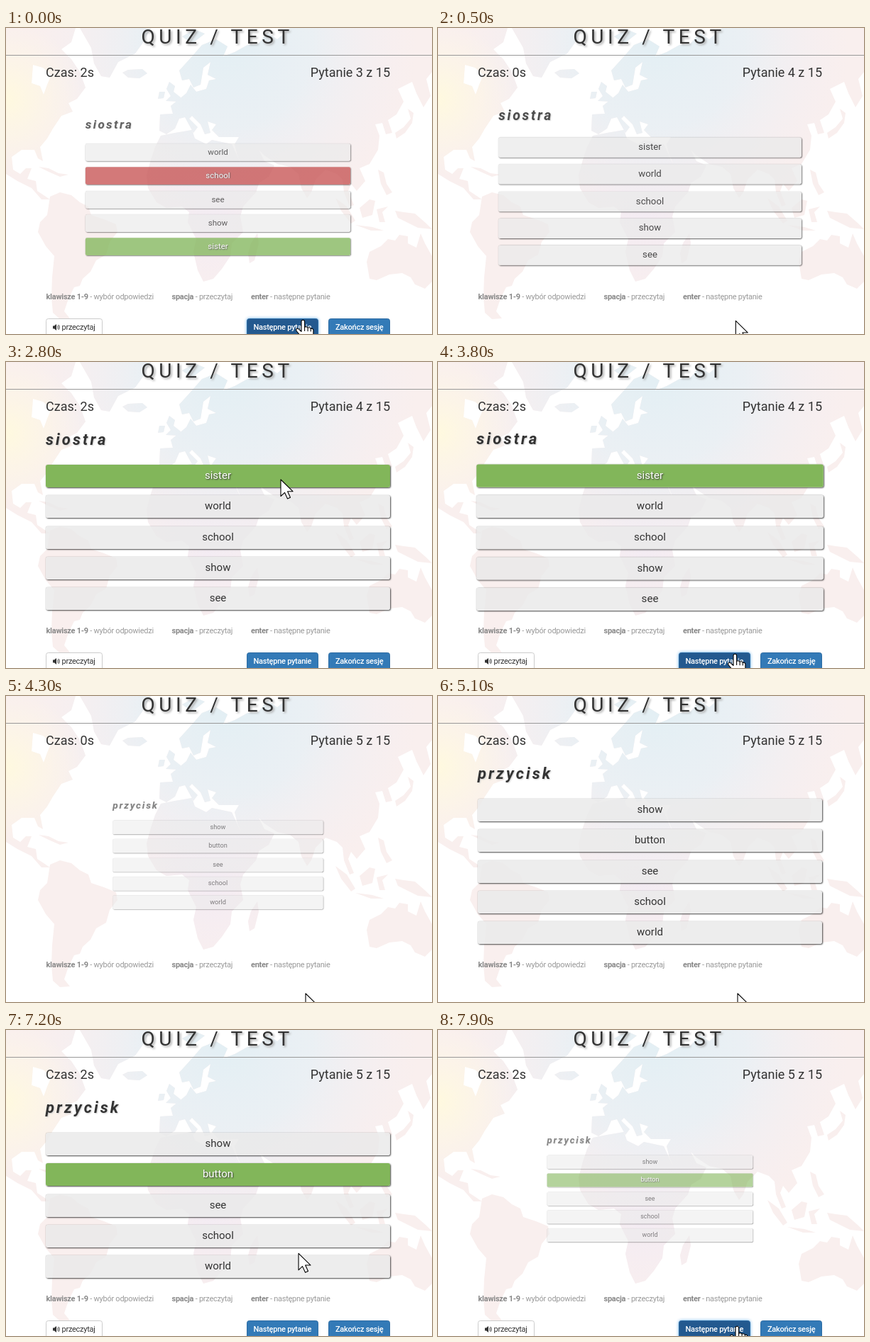
An HTML page for the animation above (8 s loop, 600 by 432 pixels).

```html
<!DOCTYPE html>
<html lang="pl">
<meta charset="utf-8">
<title>Quiz / Test</title>
<style>
html, body { margin: 0; width: 100%; height: 100%; overflow: hidden; background: #fff; font-family: Roboto, sans-serif; color: #333 }
svg, #panel { position: absolute; left: 0; top: 0; width: 600px; height: 432px }
#panel { transform-origin: 298.5px 224px }
#word { position: absolute; left: 56px; top: 98.5px; font: italic bold 22px/22px Roboto, sans-serif; letter-spacing: 3.1px; text-shadow: 1px 1px 2px #ccc }
.row { position: absolute; left: 56px; width: 485px; height: 32px; font-size: 15px; line-height: 31px; text-align: center;
  border-radius: 3px; background: rgba(234,234,234,.85); box-shadow: 1px 1px 2px rgba(0,0,0,.7), 0 0 1px rgba(0,0,0,.4) }
.mark { position: absolute; inset: 0; border-radius: 3px; color: #fff; text-shadow: 1px 1px 2px #333 }
.small { font-size: 11px; letter-spacing: -.26px }
.hint { fill: #999 }
.hint tspan { font-weight: bold; fill: #888 }
.blue { fill: #337ab7; stroke: #2e6da4 }
.white { fill: #fff; font-weight: 500 }
</style>
<svg viewBox="0 0 600 432">
  <defs>
    <radialGradient id="sky" gradientUnits="userSpaceOnUse" cx="310" cy="20" r="270">
      <stop stop-color="#e3eff4"/><stop offset=".45" stop-color="#e8f0f5" stop-opacity=".85"/><stop offset="1" stop-color="#f2eef4" stop-opacity="0"/>
    </radialGradient>
    <radialGradient id="sun" gradientUnits="userSpaceOnUse" cx="0" cy="100" r="110">
      <stop stop-color="#fff9df"/><stop offset="1" stop-color="#fff9e6" stop-opacity="0"/>
    </radialGradient>
    <radialGradient id="lilac" gradientUnits="userSpaceOnUse" cx="290" cy="270" r="130">
      <stop stop-color="#f4ecf3"/><stop offset="1" stop-color="#f4ecf3" stop-opacity="0"/>
    </radialGradient>
    <clipPath id="land">
      <!-- Americas -->
      <path d="M0 0H98L92 20 78 30 92 44 104 62 112 84 100 100 88 106 94 118 78 124 66 142 58 156 48 168 52 188 45 184 40 172 22 172 8 182 10 200 20 206 28 198 36 198 30 213 42 216 44 230 56 238 62 242 50 242 36 226 16 216 0 206ZM38 52L36 78 48 82 53 94 58 80 64 66 52 56Z" clip-rule="evenodd"/>
      <path d="M62 238L76 232 92 236 104 246 116 252 120 264 138 270 155 277 157 288 146 302 141 320 127 328 119 344 108 354 104 364 96 366 90 378 86 388 82 400 90 410 76 411 66 402 64 380 65 352 68 322 56 308 45 288 48 274 58 264Z"/>
      <path d="M104 0H204L192 22 182 36 158 48 146 70 134 68 124 50 120 28Z"/>
      <path d="M164 63L172 59 192 58 199 64 188 71 172 70ZM46 196L60 198 74 205 88 207 76 210 60 203Z"/>
      <!-- Europe and Asia -->
      <path d="M216 145L217 122 235 121 232 110 242 102 254 92 260 80 268 90 282 86 286 74 296 72 284 66 288 48 278 56 274 80 264 84 258 72 248 74 244 60 262 40 276 24 296 16 312 26 306 40 322 34 340 24 356 22 368 6 382 16 400 0H600V62L592 72 598 96 588 112 578 92 572 76 552 86 560 104 550 122 538 130 544 148 535 150 530 134 520 136 526 152 524 172 512 192 498 198 506 216 494 230 486 220 482 230 490 250 484 252 476 232 474 214 466 206 450 200 436 214 430 232 424 240 416 226 412 206 400 196 382 192 364 180 356 172 364 188 378 194 370 210 348 224 340 212 326 180 322 164 328 154 300 154 290 144 296 136 284 132 288 148 280 150 274 136 262 124 258 128 270 140 264 148 252 126 244 128 238 142 226 150Z"/>
      <path d="M225 103L232 96 226 86 230 76 238 82 236 90 246 98 242 104ZM216 90L224 90 222 99 214 100ZM548 148L560 140 570 128 566 114 574 120 572 134 562 148 550 156ZM248 12L266 2 280 8 262 22Z"/>
      <!-- Africa -->
      <path d="M218 152L238 148 262 144 266 156 282 164 290 158 318 164 328 186 340 208 346 216 358 214 352 232 334 252 330 266 334 288 318 304 316 322 304 340 292 354 278 358 270 342 264 316 268 298 256 274 258 260 248 252 226 254 212 246 200 226 198 208 204 186 210 168Z"/>
      <path d="M354 290L356 304 350 328 343 332 341 318 345 304Z"/>
      <!-- Islands and Australia -->
      <path d="M464 240L480 252 492 272 486 276 472 258ZM498 254L512 242 520 244 516 264 502 268ZM492 278L516 281 532 286 514 286ZM522 256L538 252 530 260 534 274 526 274ZM548 258L560 260 576 262 592 276 600 284 580 282 568 276 552 268ZM524 200L532 204 536 220 544 232 536 236 528 220Z"/>
      <path d="M508 330L512 316 528 308 538 298 548 300 554 292 566 294 566 304 578 310 584 290 590 304 600 322V358L590 368 576 362 570 352 558 346 540 348 522 356 512 354Z"/>
    </clipPath>
  </defs>
  <g clip-path="url(#land)">
    <path fill="#f9efee" d="M0 0H600V432H0Z"/>
    <path fill="url(#lilac)" d="M0 0H600V432H0Z"/>
    <path fill="url(#sky)" d="M0 0H600V432H0Z"/>
    <path fill="url(#sun)" d="M0 0H600V432H0Z"/>
  </g>
</svg>
<div id="panel"></div>
<svg viewBox="0 0 600 432" fill="#333">
  <text x="190.5" y="22" font-size="28" letter-spacing="5.6" style="filter:drop-shadow(2px 2px 1.5px #aaa)">QUIZ / TEST</text>
  <path d="M0 38.5H600" stroke="#999"/>
  <text id="clock" x="56" y="69" font-size="18"></text>
  <text id="count" x="541" y="69" font-size="18" text-anchor="end"></text>
  <g class="small hint">
    <text x="56.5" y="383"><tspan>klawisze 1-9</tspan> - wybór odpowiedzi</text>
    <text x="233.5" y="383"><tspan>spacja</tspan> - przeczytaj</text>
    <text x="345" y="383"><tspan>enter</tspan> - następne pytanie</text>
  </g>
  <g id="buttons" class="small">
    <rect x="56.5" y="410.5" width="79" height="30" rx="3" fill="#fff" stroke="#ccc"/>
    <path d="M66 420.5h2l3-2.5v9l-3-2.500h-2z"/>
    <path d="M72.500 420.500q1.500 2 0 4M74 419q2.800 3.500 0 7" fill="none" stroke="#333"/>
    <text x="78.500" y="426">przeczytaj</text>
    <rect id="next" class="blue" x="339.5" y="410.5" width="100" height="30" rx="3"/>
    <text class="white" x="348.500" y="426">Następne pytanie</text>
    <rect class="blue" x="454.500" y="410.500" width="86" height="30" rx="3"/>
    <text class="white" x="464" y="426">Zakończ sesję</text>
  </g>
  <g id="cursor" fill="#fff" stroke="#000" stroke-width="1.1" stroke-linejoin="round">
    <path id="arrow" d="M0 0V23.500L5.500 18.300 9.500 27 13.500 25.200 9.600 16.700H17Z"/>
    <path id="hand" d="M-2 2.500a2.300 2.300 0 0 1 4.600 0v8q2.500-2 4.500 .8 2.600-1.400 4.200 1 3-.8 3.600 2.200v7.500q-.5 3-2.200 5v3.500H1.500v-3q-5-5-10.500-12-1.200-3.500 2.500-3.200l4.500 4.200zM2.600 10v6M7.100 11.300v5M11.300 12.500v4"/>
  </g>
</svg>
<script>
const $ = id => document.getElementById(id);
const LOOP = 8000, LEAVE_MS = 400, ROW_TOP = 145, ROW_STEP = 43.3;
const questions = [
  { no: 3, word: 'siostra', options: 'world school see show sister', right: 4, wrong: 1, start: -3500, grow: 500, answer: -1000, leave: -284 },
  { no: 4, word: 'siostra', options: 'sister world school show see', right: 0, start: 200, grow: 500, answer: 2550, leave: 3760 },
  { no: 5, word: 'przycisk', options: 'show button see school world', right: 1, start: 4200, grow: 300, answer: 6650, leave: 7580 }
];
// time, x, y of the pointer tip
const pointer = [
  [0, 418, 412], [300, 418, 412], [600, 420, 414], [1400, 420, 414], [1700, 418, 407], [2300, 388, 168], [2400, 387, 166],
  [2850, 387, 166], [3400, 418, 412], [3800, 418, 412], [4300, 422, 420], [5400, 422, 420], [5600, 422, 410], [5700, 422, 410],
  [6200, 410, 287], [6600, 405, 205], [6800, 405, 205], [7200, 412, 315], [7500, 421, 418], [LOOP, 421, 418]
];
const clamp = v => Math.max(0, Math.min(1, v));
let shown;

function build(q) {
  const row = (text, i) => {
    const color = i === q.right ? '#82b65a' : i === q.wrong ? '#c65252' : '';
    const mark = color && `<div class="mark" style="background:${color}">${text}</div>`;
    return `<div class="row" style="top:${ROW_TOP + i * ROW_STEP}px">${text}${mark}</div>`;
  };
  $('panel').innerHTML = `<div id="word">${q.word}</div>` + q.options.split(' ').map(row).join('');
  $('count').textContent = `Pytanie ${q.no} z 15`;
  shown = q;
}

function pointerAt(t) {
  const i = pointer.findIndex(p => p[0] > t);
  const [t0, x0, y0] = pointer[i - 1], [t1, x1, y1] = pointer[i];
  const k = (t - t0) / (t1 - t0);
  return [x0 + (x1 - x0) * k, y0 + (y1 - y0) * k];
}

function scaleAt(q, t) {
  if (t < q.leave) return 1 - (1 - clamp((t - q.start) / q.grow)) ** 2.3;
  const p = clamp((t - q.leave) / LEAVE_MS);
  return 1 - p * p * (1.9 * p - .9); // swells slightly before shrinking
}

function draw(now) {
  const t = now % LOOP;
  const q = questions.findLast(q => t >= q.start);
  if (q !== shown) build(q);

  const scale = scaleAt(q, t);
  $('panel').style.transform = `scale(${scale})`;
  $('panel').style.opacity = Math.min(1, scale);
  $('clock').textContent = `Czas: ${Math.floor((Math.min(t, q.answer) - q.start) / 1000)}s`;

  const reveal = clamp((t - q.answer) / 200), answered = reveal > 0;
  document.querySelectorAll('.mark').forEach(m => m.style.opacity = reveal);
  $('buttons').style.opacity = reveal;

  const [x, y] = pointerAt(t);
  const onNext = answered && y > 409;
  const rowY = y - ROW_TOP;
  const onRow = !answered && rowY > 0 && rowY < 5 * ROW_STEP && rowY % ROW_STEP < 32;
  const pressed = t >= q.leave - 100;
  $('next').style.fill = pressed ? '#23598f' : onNext ? '#286090' : '';
  $('next').style.filter = pressed ? 'drop-shadow(0 0 2px #66afe9)' : '';
  $('hand').style.display = onNext || onRow ? '' : 'none';
  $('arrow').style.display = onNext || onRow ? 'none' : '';
  $('cursor').setAttribute('transform', `translate(${x} ${y})`);
}

const begin = performance.now();
function tick() {
  draw(performance.now() - begin);
  requestAnimationFrame(tick);
}
tick();
</script>
</html>
```
